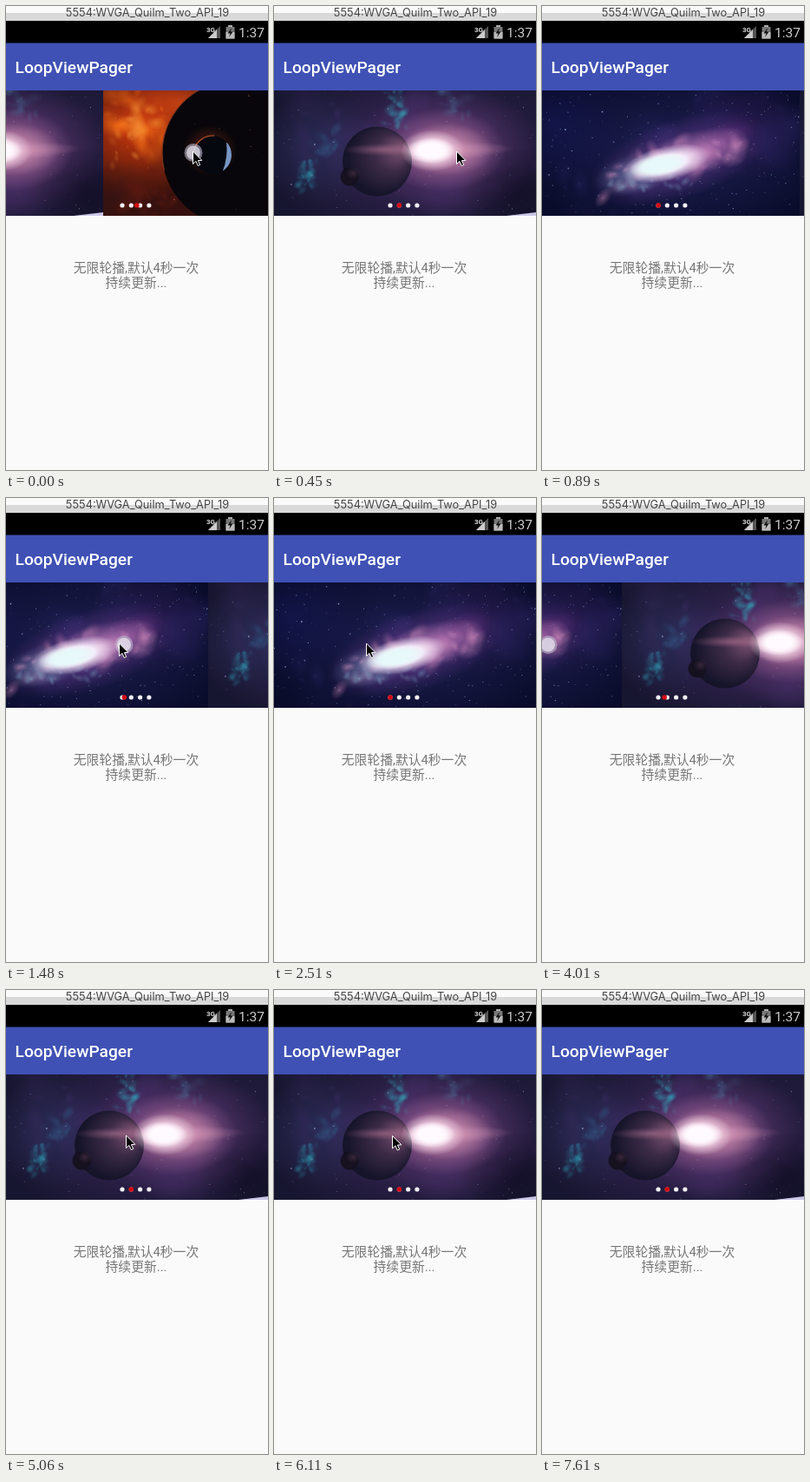
Animation of 302x533 px, one loop 8000 ms. Source, as an HTML page with a canvas:

```html
<!DOCTYPE html>
<html>
<head>
<meta charset="utf-8">
<style>
html, body { margin: 0; width: 100%; height: 100%; overflow: hidden; background: #fafafa; }
canvas { display: block; }
</style>
</head>
<body>
<canvas id="stage" width="302" height="533"></canvas>
<script>
const W = 302, PAGE_H = 144, TOP = 97, LOOP = 8000;
const ctx = document.getElementById('stage').getContext('2d');

let seed = 7;
const rnd = () => (seed = seed * 16807 % 2147483647) / 2147483647;
const spread = r => (rnd() + rnd() - 1) * r;

function makePage(base, paint) {
  const c = document.createElement('canvas');
  c.width = W;
  c.height = PAGE_H;
  const g = c.getContext('2d');
  g.fillStyle = base;
  g.fillRect(0, 0, W, PAGE_H);
  paint(g);
  return c;
}

// Soft ellipse; "hard" is the share of the radius that stays solid.
function blob(g, x, y, rx, ry, deg, rgb, alpha, hard = 0) {
  g.save();
  g.translate(x, y);
  g.rotate(deg * Math.PI / 180);
  g.scale(rx, ry);
  const fill = g.createRadialGradient(0, 0, 0, 0, 0, 1);
  fill.addColorStop(hard, `rgba(${rgb},${alpha})`);
  fill.addColorStop(1, `rgba(${rgb},0)`);
  g.fillStyle = fill;
  g.fillRect(-1, -1, 2, 2);
  g.restore();
}

function disc(g, x, y, r, fill) {
  g.fillStyle = fill;
  g.beginPath();
  g.arc(x, y, r, 0, 7);
  g.fill();
}

function stars(g, count, rgb) {
  for (let i = 0; i < count; i++) {
    g.fillStyle = `rgba(${rgb},${0.15 + rnd() ** 3 * 0.75})`;
    const s = rnd() < 0.1 ? 1.5 : 1;
    g.fillRect(rnd() * W, rnd() * PAGE_H, s, s);
  }
}

// Ragged cloud scattered along a line.
function wisp(g, x0, y0, x1, y1, width, rgb, alpha, count = 35) {
  for (let i = 0; i < count; i++) {
    const u = i / count, r = 2 + rnd() * width * 0.6;
    blob(g, x0 + (x1 - x0) * u + spread(width), y0 + (y1 - y0) * u + spread(width),
      r, r * 0.6, rnd() * 180, rgb, alpha * rnd());
  }
}

function paintGalaxy(g) {
  blob(g, 160, 72, 190, 105, 0, '38,38,96', 0.75);
  blob(g, 20, 40, 80, 70, 0, '22,26,92', 0.5);
  blob(g, 235, 45, 75, 60, 0, '62,32,98', 0.45);
  wisp(g, 10, 130, 290, 20, 70, '48,42,110', 0.3, 50);
  stars(g, 230, '170,190,235');
  blob(g, 163, 79, 108, 46, -18, '112,62,145', 0.75);
  blob(g, 112, 96, 48, 24, -14, '125,145,185', 0.65);
  blob(g, 212, 60, 42, 22, -25, '125,60,140', 0.55);
  blob(g, 176, 74, 70, 26, -17, '215,145,198', 0.8);
  wisp(g, 85, 107, 238, 52, 26, '225,150,195', 0.45, 60);
  wisp(g, 85, 110, 175, 103, 13, '130,165,195', 0.5, 28);
  blob(g, 148, 84, 52, 20, -13, '245,235,250', 1, 0.45);
  blob(g, 140, 86, 35, 13, -10, '230,250,250', 0.9, 0.55);
}

function paintNebula(g) {
  blob(g, 165, 68, 180, 105, 0, '72,46,104', 0.8);
  blob(g, 55, 65, 75, 65, 0, '38,48,92', 0.6);
  blob(g, 200, 68, 108, 75, 0, '112,65,125', 0.7);
  wisp(g, 20, 30, 290, 80, 80, '80,52,120', 0.3, 50);
  blob(g, 284, 120, 62, 55, 0, '16,12,34', 0.7);
  wisp(g, 136, 0, 147, 38, 12, '50,165,185', 0.55);
  wisp(g, 147, 38, 118, 50, 10, '55,150,180', 0.35, 18);
  wisp(g, 190, 6, 222, 26, 16, '75,130,170', 0.35, 25);
  wisp(g, 42, 82, 34, 112, 12, '45,150,175', 0.5);
  wisp(g, 55, 72, 72, 50, 18, '50,110,150', 0.35, 25);
  stars(g, 80, '170,170,215');
  blob(g, 194, 68, 73, 48, 0, '170,105,150', 0.65, 0.35);
  blob(g, 198, 68, 55, 30, 0, '205,145,175', 0.6, 0.4);
  blob(g, 177, 70, 100, 11, -2, '225,160,190', 0.75);

  const body = g.createRadialGradient(148, 66, 4, 118, 82, 52);
  body.addColorStop(0, '#79506f');
  body.addColorStop(0.35, '#3c2b47');
  body.addColorStop(0.75, '#17152b');
  body.addColorStop(1, '#100e20');
  disc(g, 119, 81.5, 40, body);
  blob(g, 125, 68, 46, 7, 0, '205,130,165', 0.45);
  disc(g, 87, 99, 10.5, '#15111f');
  blob(g, 91, 95, 8, 7, 0, '90,60,85', 0.5);
  blob(g, 183, 69, 37, 24, 0, '252,228,242', 1, 0.35);
  blob(g, 181, 69, 28, 15, 0, '255,250,255', 1, 0.5);

  g.fillStyle = '#cbc7e6';
  g.beginPath();
  g.moveTo(268, PAGE_H);
  g.quadraticCurveTo(285, 142, W, 140);
  g.lineTo(W, PAGE_H);
  g.fill();
}

function paintEclipse(g) {
  blob(g, 40, 42, 100, 85, 0, '225,62,12', 0.9);
  blob(g, 88, 15, 70, 40, 0, '225,75,20', 0.7);
  blob(g, 15, 125, 60, 45, 0, '55,20,18', 0.7);
  wisp(g, 5, 15, 95, 65, 38, '255,120,25', 0.5, 45);
  wisp(g, 10, 70, 55, 25, 25, '250,155,55', 0.5, 30);
  wisp(g, 0, 105, 85, 125, 30, '95,25,15', 0.6, 40);
  blob(g, 210, 10, 75, 50, 0, '55,20,20', 0.7);
  blob(g, 118, 50, 50, 65, 25, '205,70,25', 0.5);
  disc(g, 151, 72, 83, '#08060a');
  g.strokeStyle = '#80351d';
  g.lineWidth = 1.2;
  g.beginPath();
  g.arc(151, 72, 83, 2.9, 4.5);
  g.stroke();
  stars(g, 35, '200,130,100');
  blob(g, 123, 69, 31, 29, 0, '105,38,22', 0.65, 0.3);
  disc(g, 126, 74, 22, '#060810');
  g.strokeStyle = '#c95a27';
  g.beginPath();
  g.arc(126, 74, 22, 3.3, 4.8);
  g.stroke();
  g.fillStyle = '#7896c5';
  g.beginPath();
  g.arc(126, 74, 22, -0.75, 1);
  g.quadraticCurveTo(144, 77, 142.1, 59);
  g.fill();
}

const pages = [
  makePage('#090b29', paintGalaxy),
  makePage('#171630', paintNebula),
  makePage('#35100e', paintEclipse)
];

// Tracks hold [step, value] pairs; a null value hides the item.
const scroll = [[0, 1.63], [1, 1.38], [2, 1.1], [3, 1], [4, 0.96], [5, 0.4], [6, 0.015],
  [7, 0], [8, 0], [9, 0.07], [10, 0.228], [11, 0.34], [13, 0.05], [14, 0], [17, 0],
  [18, 0.05], [20, 0.32], [22, 0.05], [23, 0], [24, 0.03], [25, 0.16], [27, 0.695],
  [28, 0.88], [29, 0.97], [30, 1]];
const pointer = [[0, 215], [1, 286], [2, null], [3, 210], [4, 110], [5, 270], [6, null],
  [8, 212], [10, 130], [11, 94], [13, 165], [14, 150], [15, 150], [17, 106], [18, 92],
  [20, 18], [22, 125], [23, 215], [25, 160], [26, 70], [27, null], [32, 1], [34, 138],
  [40, 138], [41, 136], [50, 136], [51, null]];
const finger = [[0, 216], [1, 284], [2, null], [4, 108], [5, 265], [6, null],
  [9, 184], [10, 136], [11, 102], [12, 140], [13, null], [18, 95], [20, 24],
  [21, 70], [22, null], [24, 210], [25, 170], [27, 7], [28, null]];

function at(track, k) {
  let i = track.length - 1;
  while (i > 0 && track[i][0] > k) i--;
  const [k0, v0] = track[i];
  if (track[0][0] > k || v0 === null) return null;
  const next = track[i + 1];
  if (!next || next[1] === null) return v0;
  return v0 + (next[1] - v0) * (k - k0) / (next[0] - k0);
}

function rect(x, y, w, h, fill) {
  ctx.fillStyle = fill;
  ctx.fillRect(x, y, w, h);
}

function poly(fill, ...pts) {
  ctx.fillStyle = fill;
  ctx.beginPath();
  for (let i = 0; i < pts.length; i += 2) ctx.lineTo(pts[i], pts[i + 1]);
  ctx.closePath();
  ctx.fill();
}

function label(str, x, y, font, fill, align = 'left') {
  ctx.font = font;
  ctx.fillStyle = fill;
  ctx.textAlign = align;
  ctx.fillText(str, x, y);
}

function drawChrome() {
  rect(0, 0, W, 533, '#fafafa');
  rect(0, 8, W, 9, '#d9d9d9');
  label('5554:WVGA_Quilm_Two_API_19', 163, 12, '12.8px Inter, sans-serif', '#444', 'center');
  rect(0, 17, W, 26, '#000');
  poly('#555', 233, 37, 247, 37, 247, 23);
  poly('#ccc', 233, 37, 243, 37, 243, 27);
  label('3G', 231, 30, 'bold 8px Roboto, sans-serif', '#ddd');
  rect(256, 22, 5, 2, '#aaa');
  rect(253.5, 24, 10, 13.5, '#777');
  rect(253.5, 30, 10, 7.5, '#bbb');
  poly('#111', 260, 25, 255.5, 31.5, 258.5, 31.5, 257, 36, 261.5, 29.5, 258.8, 29.5);
  label('1:37', 298, 36, '15.5px Roboto, sans-serif', '#ccc', 'right');
  rect(0, 42.5, W, 54.5, '#3f51b5');
  label('LoopViewPager', 10.5, 77, '500 19.2px Roboto, sans-serif', '#fff');
  const font = '14.8px Roboto, "Noto Sans CJK SC", "Noto Sans CJK", sans-serif';
  label('无限轮播,默认4秒一次', 150, 306, font, '#777', 'center');
  label('持续更新...', 150, 323, font, '#777', 'center');
}

function drawPager(pos) {
  const first = Math.floor(pos);
  for (const i of [first, first + 1]) {
    if (pages[i]) ctx.drawImage(pages[i], Math.round((i - pos) * W), TOP);
  }
  for (let i = 0; i < 4; i++) disc(ctx, 134 + i * 10.3, 229, 2.6, '#f4f1f6');
  disc(ctx, 134 + pos * 10.3, 229, 2.8, '#d60b12');
}

function drawTouch(x) {
  disc(ctx, x, 168.5, 10.5, 'rgba(190,185,205,.6)');
  disc(ctx, x, 168.5, 8, 'rgba(240,238,248,.65)');
}

function drawPointer(x, y) {
  ctx.save();
  ctx.translate(x + 0.5, y + 0.5);
  poly('#000', 0, 0, 0, 14.5, 3.4, 11.4, 5.8, 16.5, 8.2, 15.5, 5.9, 10.6, 10.3, 10.3);
  ctx.strokeStyle = '#fff';
  ctx.lineWidth = 1;
  ctx.stroke();
  ctx.restore();
}

function frame() {
  const t = performance.now() % LOOP;
  const k = Math.floor((t + 20) / 148.8);
  drawChrome();
  drawPager(at(scroll, k));
  const fx = at(finger, k), px = at(pointer, k);
  if (fx !== null) drawTouch(fx);
  if (px !== null) drawPointer(px, k === 32 ? 180 : k === 33 ? 172 : k > 40 ? 167 : 166.5);
  requestAnimationFrame(frame);
}
frame();
</script>
</body>
</html>
```
